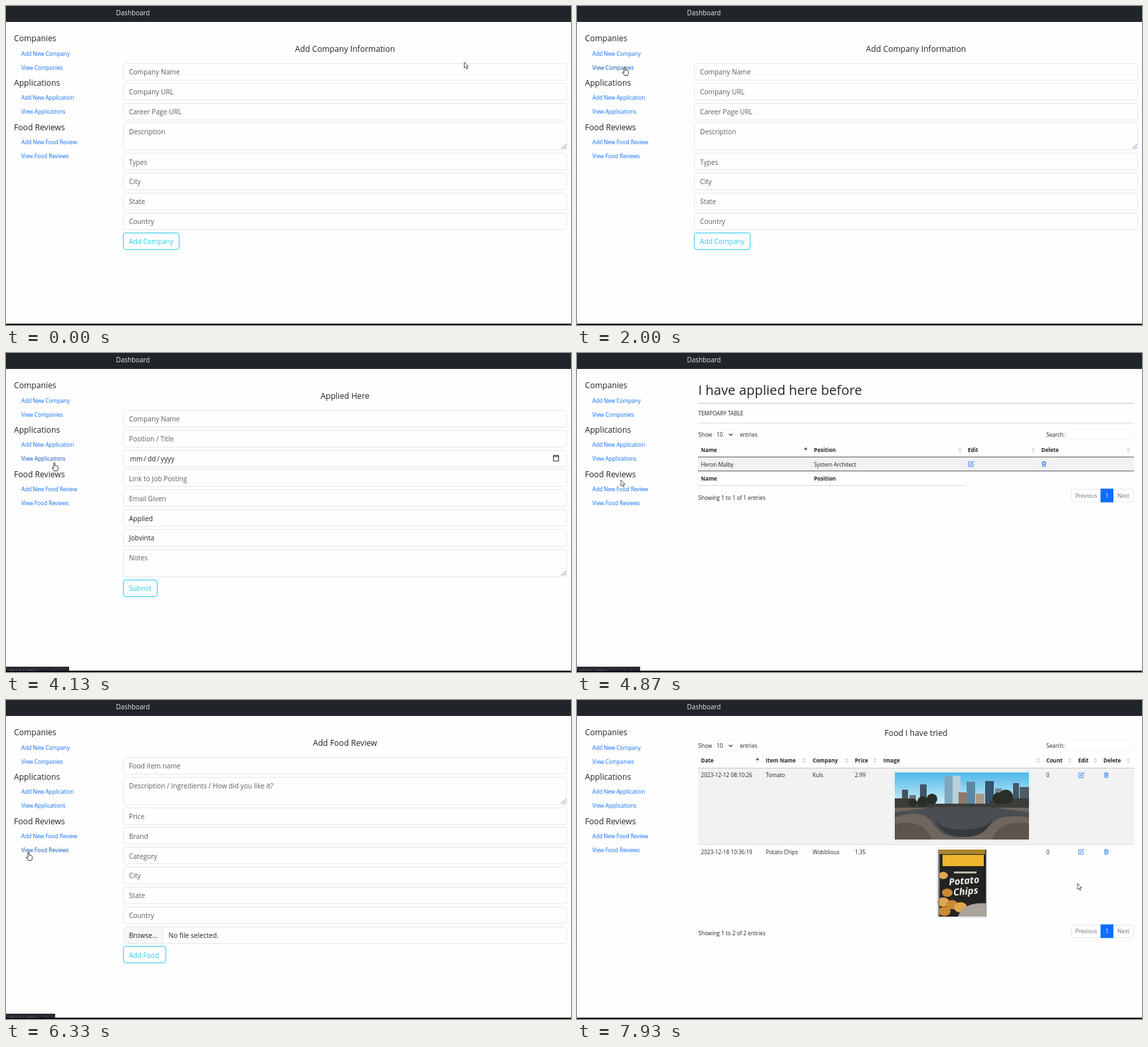
Write an HTML page that moves like this. It is 850 px wide and 480 px high and loops after 8 s.

```html
<!DOCTYPE html>
<html lang="en">
<head>
<meta charset="utf-8">
<title>Dashboard</title>
<style>
html, body { margin: 0; width: 100%; height: 100%; overflow: hidden; background: #fefefe; }
svg { display: block; }
text { font: 8.2px "Open Sans", "Noto Sans", sans-serif; fill: #212529; white-space: pre; }
.h1 { font-size: 20.2px; }
.h5 { font-size: 12.15px; }
.brand { font-size: 9.9px; fill: #e9eaea; }
.input { font-size: 10.2px; }
.hint { fill: #5b5f63; }
.date { word-spacing: -.8px; }
.btn { fill: #29cbe8; }
.head { font-weight: 700; font-size: 8.05px; }
.mid { text-anchor: middle; }
.grey { fill: #6c757d; }
.white { fill: #fff; }
.link { fill: #0d6efd; }
.under { text-decoration: underline; }
.hot { fill: #0a4fb8; }
.url { font-size: 6px; fill: #ddd; }
.pack { font: italic 700 14.5px "Open Sans", sans-serif; fill: #f1efe9; }
.icon { fill: none; stroke: #0d6efd; stroke-width: 1.4; }
.box { fill: #fefefe; stroke: #e4e7ea; }
.control { fill: #fefefe; stroke: #eff1f2; }
.page { visibility: hidden; }
.page.on { visibility: visible; }
</style>
</head>
<body>
<svg id="stage" width="850" height="480" viewBox="0 0 850 480"></svg>
<script>
const text = (x, y, s, cls = '') => `<text x="${x}" y="${y}" class="${cls}">${s}</text>`;
const rect = (x, y, w, h, fill, more = '') =>
  `<rect x="${x}" y="${y}" width="${w}" height="${h}" fill="${fill}" ${more}/>`;
const box = (x, y, w, h, r = 3.5, cls = 'box') =>
  `<rect x="${x}" y="${y}" width="${w}" height="${h}" rx="${r}" class="${cls}"/>`;
const shape = (d, fill, more = '') => `<path d="${d}" fill="${fill}" ${more}/>`;
const rule = (y, color, x2 = 838) => rect(182, y, x2 - 182, 1, color);

const icons = {
  open: 'M8.5 3.5h-7v11h11V8M10 1h5v5M15 1L7 9',
  edit: 'M9 2.5H2v12h12V8M6 10.500l.7-2.700L14 .8l1.800 1.800L8.700 9.800z',
  bin: 'M2 4h12M6 3.500v-2h4v2M3.500 4l.8 10.500h7.400L12.500 4M6.300 6.500v5.500M9.700 6.500v5.500'
};
const icon = (name, x, y) =>
  `<path class="icon" d="${icons[name]}" transform="translate(${x - 4.6} ${y - 4.6}) scale(.57)"/>`;

const sorter = (x, y, active) =>
  shape(`M${x - 2.7} ${y - .4}l2.700-3.800 2.700 3.800z`, active ? '#4a4d50' : '#d9dbdd') +
  shape(`M${x - 2.7} ${y + .8}l2.700 3.800 2.700-3.800z`, active ? '#efefef' : '#d9dbdd');

// Form pages: each field is [label, kind]
function form(title, fields, button, width) {
  let y = 85.9, out = text(510, 68.5, title, 'h5 mid');
  for (const [label, kind] of fields) {
    const top = Math.round(y) + .5, area = kind === 'area';
    const base = y + 17.4, h = area ? 41 : 25;
    out += box(176.5, top, 667, h);
    if (kind === 'file') {
      out += rect(177, top + .5, 58.5, 24, '#f6f7f8') + rect(235, top, 1, 25, '#e4e7ea');
      out += text(185, base, 'Browse...', 'input') + text(244.5, base, label, 'input');
    } else {
      const cls = kind === 'value' ? '' : kind === 'date' ? 'date' : 'hint';
      out += text(kind === 'date' ? 186.5 : 185, base, label, 'input ' + cls);
    }
    if (kind === 'date')
      out += shape(`M823.500 ${top + 9.5}h8v6.500h-8zM823.500 ${top + 9.500}v-1.500h8v1.500M825.500 ${top + 8}v-1.500M829.500 ${top + 8}v-1.500`,
        'none', 'stroke="#333"');
    if (area)
      out += shape(`M835.500 ${top + 39.5}l7-7M839.500 ${top + 39.500}l3-3`, 'none', 'stroke="#777"');
    y += area ? 45.75 : 29.85;
  }
  return out + rect(176.5, Math.round(y) + .5, width, 25, '#fefefe', 'rx="3.500" stroke="#29cbe8"') +
    text(185, y + 17.4, button, 'input btn');
}

const controls = y =>
  text(182.5, y + 3, 'Show') + box(205.5, y - 8.5, 36, 16, 2, 'control') + text(210, y + 3, '10') +
  shape(`M228.500 ${y - 1.5}l2.700 2.700 2.700-2.700`, 'none', 'stroke="#343a40" stroke-width="1.200"') +
  text(245, y + 3, 'entries') + text(706, y + 3, 'Search:') + box(736.5, y - 8.5, 101, 16, 2, 'control');

const heads = (y, cols, sorts) =>
  cols.map(([x, s]) => text(x, y + 3.2, s, 'head')).join('') +
  sorts.map((x, i) => sorter(x, y, i === 0)).join('');

const pager = (y, n) =>
  text(182.5, y + 6, `Showing 1 to ${n} of ${n} entries`) +
  box(743.5, y - 9.5, 94, 19) + rect(787.6, y - 10.4, 19.4, 20.6, '#0d6efd') +
  text(766, y + 3, 'Previous', 'mid grey') + text(797.3, y + 3, '1', 'mid white') +
  text(822, y + 3, 'Next', 'mid grey');

function companies() {
  const rows = [['Guvo', 'Not available'], ['Neto Motors', 'Kitchener'],
    ['RidoKart', 'Not available'], ['Yixa', 'San Franscisco']];
  let out = text(510, 53.5, 'Companies I am tracking', 'h5 mid') + controls(69) +
    heads(91, [[186.5, 'Company name'], [372, 'Career Link'], [517.5, 'City'], [663, 'Edit'], [740.5, 'Delete']],
      [360, 505, 650.5, 728.5, 829.5]);
  rows.forEach(([name, city], i) => {
    const y = 102.5 + i * 21.85, mid = y + 10.5;
    if (i % 2 === 0) out += rect(182, y, 656, 21.85, '#f2f2f2');
    out += rule(Math.round(y + 21.3), '#e0e3e6') +
      text(186.5, mid + 3.2, name, 'link under') + text(517.5, mid + 3.2, city) +
      icon('open', 376.5, mid) + icon('edit', 667.3, mid) + icon('bin', 744.5, mid);
  });
  return out + rule(102, '#c3c5c7') + rule(189, '#c9cbcd') + pager(204, 4);
}

function applied() {
  return text(182.5, 62.5, 'I have applied here before', 'h1') + rule(75, '#bccaca') +
    text(182.5, 94, 'TEMPOARY TABLE') + rule(105, '#dcdedf') + controls(123) +
    heads(146, [[186.5, 'Name'], [356.5, 'Position'], [588, 'Edit'], [698.5, 'Delete']], [344, 576, 686, 829.5]) +
    rect(182, 157, 656, 21, '#f2f0f1') + rule(156, '#5e6062') + rule(177, '#5e6062') +
    text(186.5, 170.5, 'Heron Malby') + text(356.5, 170.5, 'System Architect') +
    icon('edit', 592.5, 167) + icon('bin', 702.5, 167) +
    heads(189, [[186.5, 'Name'], [356.5, 'Position']], []) + rule(199, '#d4d7d9', 584) + pager(214.5, 1);
}

function street() {
  const towers = [[489, 135, 9, '#45525e'], [500, 143, 10, '#6b767d'], [516, 127, 10, '#405564'],
    [553, 115, 13, '#7fa6bd'], [565, 114, 12, '#b9d0da'], [574, 139, 12, '#8d7868'], [586, 123, 13, '#5b87a3'],
    [600, 141, 13, '#a99a86'], [614, 122, 13, '#34536d'], [629, 133, 10, '#70899a'], [656, 125, 9, '#435664'],
    [666, 131, 14, '#4e5b64']];
  const trees = [[534, 149, 8], [520, 153, 8], [505, 154, 6], [634, 148, 9], [645, 146, 11]];
  return rect(476.5, 107.5, 205, 104, '#fff', 'stroke="#dee2e6" rx="2"') +
    rect(478, 109, 202, 101, 'url(#sky)') +
    towers.map(([x, y, w, c]) => rect(x, y, w, 162 - y, c)).join('') +
    shape('M478 148h25v4h36v4h82v-4h24v-4h35v15H478z', '#3c3d38') +
    trees.map(([x, y, r]) => `<circle cx="${x}" cy="${y}" r="${r}" fill="#292f27"/>`).join('') +
    rect(478, 162, 202, 48, '#70665e') +
    shape('M539 161h80L680 169v8Q640 170 624 186T580 206T536 186T478 177v-8z', '#4a4e52') +
    shape('M539 176q4 28 41 30t46-30q-8 19-46 19t-41-19z', '#363a3e') +
    shape('M478 186q43-8 56 24h-56zM680 186q-43-8-56 24h56z', '#5e544c');
}

function snack() {
  const chips = [[551, 264, 7], [557, 290, 8], [551, 304, 9], [564, 308, 9], [577, 312, 10], [553, 318, 9]];
  return rect(541.5, 222.5, 75, 105, '#fff', 'stroke="#dee2e6" rx="2"') +
    rect(543.5, 225, 72, 101, '#232322') +
    rect(545, 225, 69, 7, '#a9842c') + rect(550, 233, 62, 17, '#efb52e') +
    rect(567, 258, 34, 3, '#bdb8ad') +
    chips.map(([x, y, r], i) => `<ellipse cx="${x}" cy="${y}" rx="${r}" ry="${r * .78}" fill="${i % 2 ? '#c98a36' : '#dda850'}"/>`).join('') +
    shape('M573 326q8-22 42.500-20v20z', '#aaa49c') + rect(543.5, 225, 2, 101, '#8e8a83') +
    `<g transform="rotate(-5 583 280)">${text(583, 277, 'Potato', 'pack mid')}${text(584, 293, 'Chips', 'pack mid')}</g>`;
}

function foods() {
  const row = (y, cells) => cells.map((s, i) => text([186.5, 284, 354.5, 418, 706][i], y + 3, s)).join('') +
    icon('edit', 758.3, y) + icon('bin', 796.3, y);
  return text(510, 53.5, 'Food I have tried', 'h5 mid') + controls(69) +
    heads(91, [[186.5, 'Date'], [284, 'Item Name'], [354.5, 'Company'], [418, 'Price'], [461, 'Image'],
      [706, 'Count'], [754, 'Edit'], [792, 'Delete']], [271.5, 342, 405.5, 448.5, 694, 741.5, 779.5, 829.5]) +
    rect(182, 102.5, 656, 115, '#f2f2f2') + rule(102, '#c3c5c7') + rule(217, '#dcdfe2') +
    row(113, ['2023-12-12 08:10:26', 'Tomato', 'Kuls', '2.99', '0']) +
    row(228.5, ['2023-12-18 10:36:19', 'Potato Chips', 'Wobblious', '1.35', '0']) +
    street() + snack() + pager(348, 2);
}

const place = [['City'], ['State'], ['Country']];
const pages = [
  [0, form('Add Company Information', [['Company Name'], ['Company URL'], ['Career Page URL'],
    ['Description', 'area'], ['Types'], ...place], 'Add Company', 84)],
  [2470, companies()],
  [3800, form('Applied Here', [['Company Name'], ['Position / Title'], ['mm / dd / yyyy', 'date'],
    ['Link to Job Posting'], ['Email Given'], ['Applied', 'value'], ['Jobvinta', 'value'], ['Notes', 'area']], 'Submit', 51)],
  [4470, applied()],
  [6330, form('Add Food Review', [['Food item name'], ['Description / Ingredients / How did you like it?', 'area'],
    ['Price'], ['Brand'], ['Category'], ...place, ['No file selected.', 'file']], 'Add Food', 64)],
  [6730, foods()]
];

const headings = [['Companies', 49], ['Applications', 115.7], ['Food Reviews', 182.3]];
const links = [['Add New Company', 71.7], ['View Companies', 93], ['Add New Application', 138.2],
  ['View Applications', 159.5], ['Add New Food Review', 204.7], ['View Food Reviews', 226]];

// Status bar: [from, width, address]
const status = [[0, 0, ''], [1400, 86, 'add_company'], [1800, 0, ''], [2200, 91, 'view_companies'], [3130, 0, ''],
  [3470, 96, 'add_application'], [4070, 95, 'view_applications'], [5000, 0, ''], [5270, 86, 'add_food_form'],
  [6330, 74, 'view_food'], [6930, 0, ''], [7470, 78, 'edit_food/2'], [7660, 0, '']];

// Pointer: [time, x, y]
const moves = [[0, 691, 83], [130, 640, 130], [330, 260, 350], [470, 120, 200], [600, 20, 50], [730, 190, 12],
  [870, 490, 45], [1200, 210, 80], [1470, 72, 72], [1670, 72, 72], [1800, 131, 86], [2000, 72, 92], [2670, 72, 92],
  [2930, 54, 111], [3270, 60, 136], [3530, 64, 139], [3830, 64, 139], [4130, 73, 165], [4600, 73, 165],
  [4870, 66, 191], [5130, 64, 206], [6320, 64, 206], [6330, 34, 229], [6470, 35, 229], [6740, 35, 229],
  [7000, 290, 205], [7330, 740, 222], [7470, 758, 229], [7530, 757, 241], [7930, 753, 276], [8000, 753, 276]];

const cursors = {
  arrow: shape('M0 0v9l2.100-1.900 1.500 3.500 1.500-.7-1.500-3.300h2.700z', '#fff', 'stroke="#333" stroke-width=".8"'),
  beam: shape('M-1.500-4h3M0-4v8M-1.500 4h3', 'none', 'stroke="#333" stroke-width=".9"'),
  hand: shape('M-1.200 7V.8Q-1.200 0-.3 0T.7.8V4.300q2-.6 2.200.7 1.500-.2 1.600.9 1.200.1 1 1.600-.1 3.500-1.500 5H-.4Q-2 10-3.600 7.800-3.500 6.300-1.200 8z',
    '#fff', 'stroke="#222" stroke-width=".9"')
};

stage.innerHTML = `
  <defs><linearGradient id="sky" x2="0" y2="1">
    <stop stop-color="#4fb9ea"/><stop offset=".45" stop-color="#c8ebf6"/></linearGradient></defs>
  ${rect(0, 0, 850, 480, '#fefefe')}${rect(0, 0, 850, 24, '#212529')}
  ${text(165.5, 13.7, 'Dashboard', 'brand')}
  ${headings.map(([s, y]) => text(12, y + 4.3, s, 'h5')).join('')}
  ${links.map(([s, y]) => text(23, y + 2.9, s, 'link side')).join('')}
  ${pages.map(p => `<g class="page">${p[1]}</g>`).join('')}
  <g id="bar">${rect(0, 472, 0, 8, '#2b2a33')}${text(2, 481, '', 'url')}</g>
  ${rect(0, 478, 850, 2, '#000')}
  <g id="pointer"></g>`;

const all = s => [...stage.querySelectorAll(s)];
const pageEls = all('.page'), sideEls = all('.side');
const barBox = stage.querySelector('#bar rect'), barText = stage.querySelector('#bar text');
const pointer = stage.querySelector('#pointer');
const last = (list, t) => list.reduce((n, row, i) => row[0] <= t ? i : n, 0);

function kind(x, y, page, hover) {
  if (hover >= 0 || page === 5 && Math.abs(x - 758) < 5 && Math.abs(y - 228) < 5) return 'hand';
  if (x > 11 && x < 90 && headings.some(h => Math.abs(y - h[1]) < 6.5)) return 'beam';
  if (page === 0 && x > 176 && x < 844 && y > 86 && y < 336) return 'beam';
  return 'arrow';
}

function draw(ms) {
  // The screen refreshes 15 times a second
  const step = 1000 / 15, t = Math.floor((ms % 8000 + 4) / step) * step + 4;
  const page = last(pages, t);
  pageEls.forEach((el, i) => el.classList.toggle('on', i === page));

  const i = Math.min(last(moves, t), moves.length - 2);
  const [t0, x0, y0] = moves[i], [t1, x1, y1] = moves[i + 1];
  const k = Math.min(1, (t - t0) / (t1 - t0));
  const x = x0 + (x1 - x0) * k, y = y0 + (y1 - y0) * k;

  const hover = x > 22 && x < 108 ? links.findIndex(l => Math.abs(y - l[1]) < 7) : -1;
  sideEls.forEach((el, n) => el.classList.toggle('hot', n === hover));
  pointer.innerHTML = cursors[kind(x, y, page, hover)];
  pointer.setAttribute('transform', `translate(${x.toFixed(1)} ${y.toFixed(1)})`);

  const [, w, path] = status[last(status, t)];
  barBox.setAttribute('width', w);
  barText.textContent = path && '127.0.0.1:5000/' + path;
}

const start = performance.now();
function tick(now) {
  draw(Math.max(0, now - start));
  requestAnimationFrame(tick);
}
draw(0);
requestAnimationFrame(tick);
</script>
</body>
</html>
```
